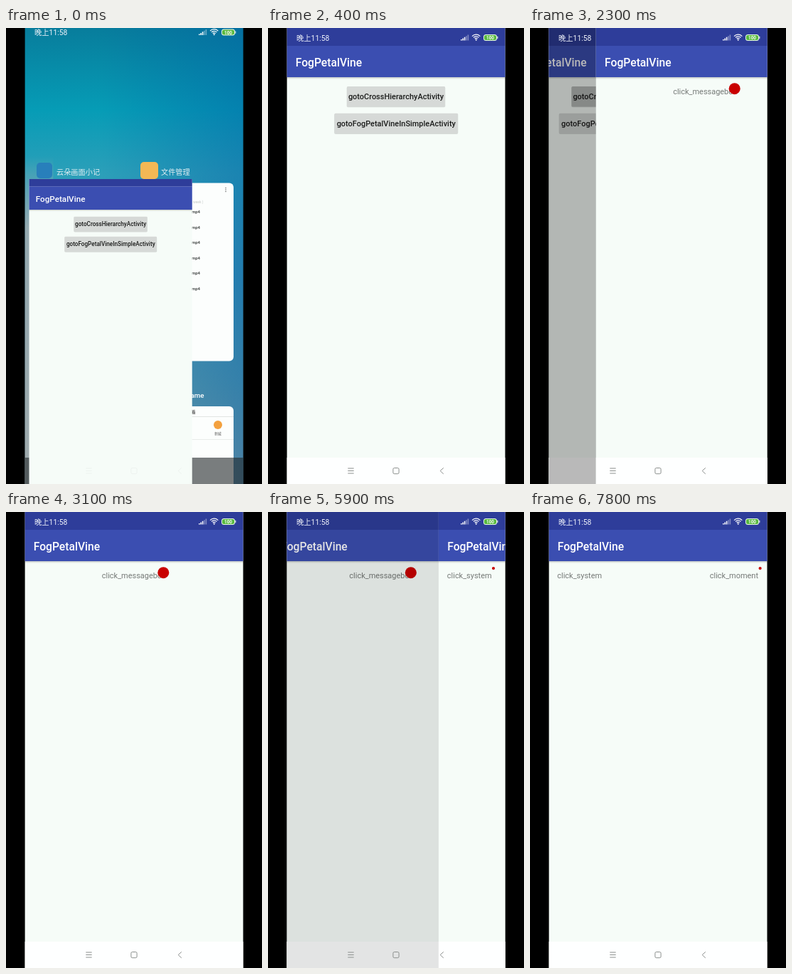
These frames come from a looping animation (360x640 px, 8 s). An HTML page with a canvas:

```html
<!DOCTYPE html>
<html lang="zh">
<head>
<meta charset="utf-8">
<style>
html, body { margin: 0; width: 100%; height: 100%; overflow: hidden; background: #000; }
canvas { display: block; width: 360px; height: 640px; }
</style>
</head>
<body>
<canvas></canvas>
<script>
const LOOP = 8000, STEP = 100;
const LEFT = 26.4, WIDTH = 307.3;
const APP = 'FogPetalVine';
const RED = '#c90000', PAPER = '#f6fcf8';
const canvas = document.querySelector('canvas');
const ctx = canvas.getContext('2d');
const ratio = window.devicePixelRatio || 1;
canvas.width = 360 * ratio;
canvas.height = 640 * ratio;

const easeOut = u => 1 - (1 - Math.min(1, Math.max(0, u))) ** 3;
const mix = (a, b, p) => a + (b - a) * p;

function rect(x, y, w, h, color, r = 0) {
  ctx.fillStyle = color;
  ctx.beginPath();
  ctx.roundRect(x, y, w, h, r);
  ctx.fill();
}

function dot(x, y, r, color) {
  ctx.fillStyle = color;
  ctx.beginPath();
  ctx.arc(x, y, r, 0, Math.PI * 2);
  ctx.fill();
}

function text(str, x, y, size, color, weight = 400, align = 'left') {
  ctx.font = `${weight} ${size}px Roboto, "Noto Sans CJK SC", "Noto Sans CJK", sans-serif`;
  ctx.textAlign = align;
  ctx.fillStyle = color;
  ctx.fillText(str, x, y);
}

function gradient(x0, y0, x1, y1, ...stops) {
  const g = ctx.createLinearGradient(x0, y0, x1, y1);
  stops.forEach(([at, color]) => g.addColorStop(at, color));
  return g;
}

function button(x, y, w, label, pressed) {
  rect(x - .3, y + .3, w + .6, 29, 'rgba(0,0,0,.13)', 2);
  rect(x, y, w, 28.5, pressed ? '#b9bcba' : '#d6d9d7', 1.5);
  text(label, x + w / 2, y + 18.3, 10.96, '#1b1c1b', 500, 'center');
}

// Pages are drawn in full-screen coordinates.
function page(content, navAlpha = 1) {
  rect(LEFT, 0, WIDTH, 640, PAPER);
  rect(LEFT, 69, WIDTH, 3, gradient(0, 69, 0, 72, [0, 'rgba(0,0,0,.2)'], [1, 'rgba(0,0,0,0)']));
  rect(LEFT, 25, WIDTH, 44, '#3b4eb1');
  rect(LEFT, 0, WIDTH, 25, '#2e3d9a');
  text(APP, 38.7, 53.7, 15.66, '#fff', 500);
  content();
  rect(LEFT, 603, WIDTH, 37, `rgba(254,255,255,${navAlpha})`);
}

const label = (str, x) => text(str, x, 93, 10.96, '#757977');

function menuPage(pressed) {
  button(111, 82, 138, 'gotoCrossHierarchyActivity', pressed);
  button(93.5, 119.7, 173.5, `goto${APP}InSimpleActivity`, false);
}

function messagePage() {
  label('click_messagebox', 134.8);
  dot(221.3, 85.2, 8, RED);
}

function detailPage(unread) {
  label('click_system', 38.3);
  label('click_moment', 252.8);
  if (unread) dot(103.5, 79, 2.1, RED);
  dot(323.6, 79, 2.1, RED);
}

function wallpaper() {
  rect(LEFT, 0, WIDTH, 640, gradient(0, 0, 0, 640,
    [0, '#087d9c'], [.18, '#069cb6'], [.32, '#2c9fb9'],
    [.55, '#3b93b5'], [.78, '#5799ad'], [1, '#7f9da5']));
  rect(LEFT, 0, WIDTH, 640, gradient(LEFT, 0, 334, 0,
    [.35, 'rgba(0,90,165,0)'], [1, 'rgba(0,90,165,.4)']));
  ctx.save();
  ctx.globalAlpha = .85;
  rect(LEFT, 180, 40, 460, gradient(0, 180, 0, 280,
    [0, 'rgba(165,172,174,0)'], [1, '#a5acae']));
  ctx.restore();
}

function recents() {
  wallpaper();
  rect(43, 189, 22, 22, '#287fbb', 5);
  text('云朵画面小记', 71, 206, 10.2, '#e1eff3');
  rect(189, 188, 25, 24, '#f4b855', 5);
  text('文件管理', 218, 206, 10.2, '#e1eff3');

  rect(189, 217.5, 131, 250, '#fcfefd', 6);
  for (const y of [224.5, 227, 229.5]) dot(309, y, .7, '#555');
  text('( week )', 260, 246, 5, '#c3c9c6');
  for (let i = 0; i < 6; i++) text('mp4', 261, 260 + i * 21.6, 6, '#303433', 500);

  text('ame', 259.5, 519, 9.8, '#fff', 500);
  rect(189, 531, 131, 115, '#fcfefd', 6);
  text('箱', 260.5, 541, 6, '#222');
  rect(189, 545, 131, .7, '#d9dddb');
  dot(298, 557, 6, '#f3a13f');
  text('新城', 298, 571, 4.8, '#555', 400, 'center');
  rect(189, 577, 131, .7, '#e2e6e4');
  rect(LEFT, 603, WIDTH, 37, 'rgba(35,40,43,.6)');
}

function opening(p) {
  recents();
  const scale = mix(.746, 1, p), top = mix(212, 0, p);
  ctx.save();
  ctx.beginPath();
  ctx.rect(LEFT, top, WIDTH, 640 - top);
  ctx.clip();
  ctx.translate(mix(32.5, LEFT, p), mix(203.5, 0, p));
  ctx.scale(scale, scale);
  ctx.translate(-LEFT, 0);
  page(() => menuPage(false), p);
  ctx.restore();
}

function slide(from, to, p) {
  ctx.save();
  ctx.translate(-WIDTH * .218 * p, 0);
  page(from);
  ctx.restore();
  rect(LEFT, 0, WIDTH, 640, `rgba(0,0,0,${p * .35})`);
  ctx.save();
  ctx.translate(WIDTH * (1 - p), 0);
  page(to);
  ctx.restore();
}

function statusBar(dy) {
  ctx.save();
  ctx.translate(0, dy);
  text('晚上11:58', 40, 17.7, 10.3, '#f1f4fb');
  for (let i = 0; i < 5; i++) {
    const h = 1.5 + i * 1.6;
    rect(271 + i * 2.4, 17.5 - h, 1.6, h, i < 3 ? '#fff' : 'rgba(255,255,255,.4)');
  }
  ctx.strokeStyle = '#fff';
  ctx.lineWidth = 1.2;
  for (const r of [2.6, 5.2, 7.8]) {
    ctx.beginPath();
    ctx.arc(292.7, 17, r, -Math.PI * .76, -Math.PI * .24);
    ctx.stroke();
  }
  dot(292.7, 16.8, 1, '#fff');
  rect(303, 9, 19, 9, '#e9f6e7', 3.5);
  rect(304, 10, 17, 7, '#58b93f', 2.5);
  rect(322.3, 11.8, 1, 3.4, '#e9f6e7', .5);
  text('100', 312.5, 16, 6.3, '#fff', 700, 'center');
  ctx.restore();
}

function navIcons(alpha) {
  ctx.save();
  ctx.globalAlpha = alpha;
  ctx.strokeStyle = '#8b8f8d';
  ctx.lineWidth = 1;
  ctx.beginPath();
  for (const y of [618, 621.5, 625]) {
    ctx.moveTo(112.3, y);
    ctx.lineTo(120.7, y);
  }
  ctx.moveTo(246.8, 617.3);
  ctx.lineTo(242.2, 621.6);
  ctx.lineTo(246.8, 625.9);
  ctx.roundRect(175.9, 617.5, 8.2, 8.2, 1.8);
  ctx.stroke();
  ctx.restore();
}

function draw(t) {
  ctx.setTransform(ratio, 0, 0, ratio, 0, 0);
  rect(0, 0, 360, 640, '#000');
  ctx.save();
  ctx.beginPath();
  ctx.rect(LEFT, 0, WIDTH, 640);
  ctx.clip();

  const open = easeOut(t / 400);
  const slideAt = start => easeOut((t - start) / 350);
  const menu = () => menuPage(t >= 1800);
  const detail = () => detailPage(t < 7800);

  if (t < 400) opening(open);
  else if (t < 2200) page(menu);
  else if (t < 2500) slide(menu, messagePage, slideAt(2160));
  else if (t < 5900) page(messagePage);
  else if (t < 6300) slide(messagePage, detail, slideAt(5860));
  else page(detail);

  statusBar(mix(-7.5, 0, open));
  navIcons(mix(.08, 1, open));
  ctx.restore();
}

const start = performance.now();
function tick() {
  const t = (performance.now() - start) % LOOP;
  draw(Math.floor(t / STEP) * STEP);
  requestAnimationFrame(tick);
}
tick();
</script>
</body>
</html>
```
